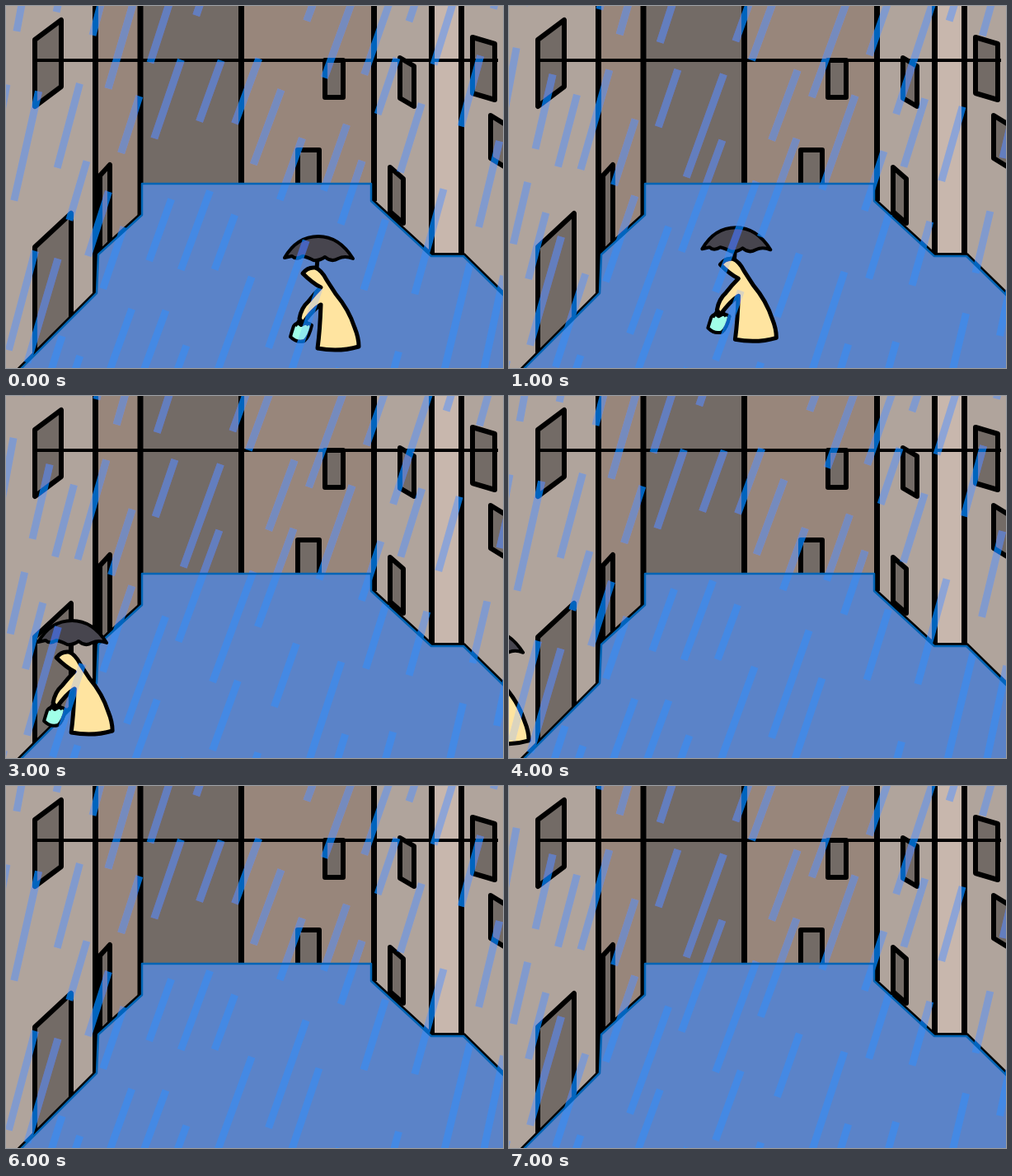
These frames come from a looping animation (603x440 px, 8 s). An HTML page with a canvas:

```html
<!DOCTYPE html>
<html>
<head>
<meta charset="utf-8">
<style>
html, body { margin: 0; width: 100%; height: 100%; overflow: hidden; }
canvas { display: block; }
</style>
</head>
<body>
<canvas id="stage" width="603" height="440"></canvas>
<script>
const ctx = document.getElementById('stage').getContext('2d');
const W = 603, H = 440, STEP = 1000, STEPS = 8;
const BROWN = '#98867b', WALL = '#b0a49c', DARK = '#736b66', INK = '#000';
ctx.lineJoin = 'round';

// Each wall: right edge, colour, and where its corner post meets the ground.
const walls = [
  [108.5, WALL, 349], [163, BROWN, 255], [285.5, DARK, 216], [446.5, BROWN, 237],
  [516.5, WALL, 304], [552.5, '#c8b7ad', 304], [W, WALL, 0]
];

// Each window: left, top, width, height, and drop of the right side.
const windows = [
  [35, 41, 32, 81, -24], [114, 206, 12, 95, -13], [35, 293, 44, 130, -41],
  [387, 66, 22, 45, 0], [354, 175, 26, 50, 0], [478, 63, 17, 49, 10],
  [466, 196, 16, 54, 14], [566, 38, 27, 68, 8], [588, 133, 26, 52, 16]
].map(([x, y, w, h, drop]) =>
  trace([[x, y], [x + w, y + drop], [x + w, y + h + drop], [x, y + h]], true));

const ground = [[15, 444], [110, 349], [112, 302], [165, 254], [165, 216], [443, 216],
  [443, 237], [516, 304], [555, 304], [606, 354], [606, 444]];
const floor = trace(ground);
const curbs = [[0, 2], [2, 4], [6, 10]].map(([from, to]) => trace(ground.slice(from, to)));

const coat = new Path2D('M360 325Q366 317 375 318Q383 321 389 333L400 350' +
  'Q416 369 423 391Q428 403 428 414Q404 421 378 416Q381 394 382 363Q372 369 360 386' +
  'L356 380Q358 367 367 359Q374 350 382 342Q372 337 360 325Z');
const bag = new Path2D('M349 389Q353 383 358 388Q365 383 371 388Q368 402 362 407' +
  'Q353 410 345 402Q347 395 349 389Z');
const strap = new Path2D('M351 389L359 377L367 388');
const handle = new Path2D('M378 307L377 319');
const umbrella = new Path2D('M338 306Q353 280 379 280Q404 280 421 307Q411 303 403 307' +
  'Q395 312 387 305Q380 310 373 309Q365 305 360 304Q352 309 347 304Z');

const rains = [makeRain(7), makeRain(23)];

function trace(points, closed = false) {
  const path = new Path2D();
  for (const [x, y] of points) path.lineTo(x, y);
  if (closed) path.closePath();
  return path;
}

function seeded(seed) {
  return () => (seed = (seed * 16807) % 2147483647) / 2147483647;
}

// Broken lanes of rain, steep at the sides and more slanted in the middle.
function makeRain(seed) {
  const rand = seeded(seed * 7919);
  const path = new Path2D();
  for (let lane = 10; lane < W + 130; lane += 44) {
    const top = lane + rand() * 20;
    const slant = 0.17 + 0.2 * Math.sin(Math.PI * Math.min(1, top / 720));
    let y = -rand() * 130;
    while (y < H) {
      const end = y + 65 + rand() * 75;
      path.moveTo(top - slant * y, y);
      path.lineTo(top - slant * end, end);
      y = end + 40 + rand() * 70;
    }
  }
  return path;
}

function fill(path, color) {
  ctx.fillStyle = color;
  ctx.fill(path);
}

function stroke(path, width, color = INK) {
  ctx.strokeStyle = color;
  ctx.lineWidth = width;
  ctx.stroke(path);
}

function drawWalls(rain) {
  let left = 0;
  for (const [right, color] of walls) {
    ctx.fillStyle = color;
    ctx.fillRect(left, 0, right - left, H);
    left = right;
  }
  for (const pane of windows) fill(pane, DARK);
  stroke(rain, 9, 'rgba(85,145,255,.5)');
  for (const pane of windows) stroke(pane, 6);
  for (const [x, , bottom] of walls) stroke(trace([[x, 0], [x, bottom]]), 7);
  stroke(trace([[35, 66], [597, 66]]), 4);
}

function drawFloor(rain) {
  ctx.save();
  ctx.translate(0, -1);
  for (const curb of curbs) stroke(curb, 6);
  ctx.restore();
  ctx.save();
  ctx.clip(floor);
  fill(floor, '#5b83c8');
  stroke(rain, 9, '#4489e4');
  ctx.restore();
  stroke(floor, 2.5, '#0064b4');
}

// Walks left in even strides with a slight bob.
function drawPerson(step, rain) {
  const x = -100 * step - 4 * Math.sin(step * 2);
  const y = -14 * Math.sin(Math.PI * step / 3.6);
  const body = new Path2D(coat);
  body.addPath(bag);
  ctx.save();
  ctx.translate(x, y);
  stroke(handle, 5);
  fill(bag, '#a0ffe8');
  stroke(bag, 4);
  stroke(strap, 4);
  fill(coat, '#ffe4a0');
  stroke(coat, 5);
  fill(umbrella, '#47454e');
  stroke(umbrella, 4);
  ctx.clip(body);
  ctx.translate(-x, -y);
  stroke(rain, 9, 'rgba(75,145,255,.2)');
  ctx.restore();
}

function draw(step) {
  const rain = rains[step % 2];
  drawWalls(rain);
  drawFloor(rain);
  if (step < 5) drawPerson(step, rain);

  // Tints only what is darker than the streak, such as ink lines.
  ctx.globalCompositeOperation = 'lighten';
  stroke(rain, 9, '#0064be');
  ctx.globalCompositeOperation = 'source-over';
}

const start = performance.now();
let shown = -1;
function tick() {
  const step = Math.floor((performance.now() - start) / STEP) % STEPS;
  if (step !== shown) draw(shown = step);
  requestAnimationFrame(tick);
}
tick();
</script>
</body>
</html>
```
